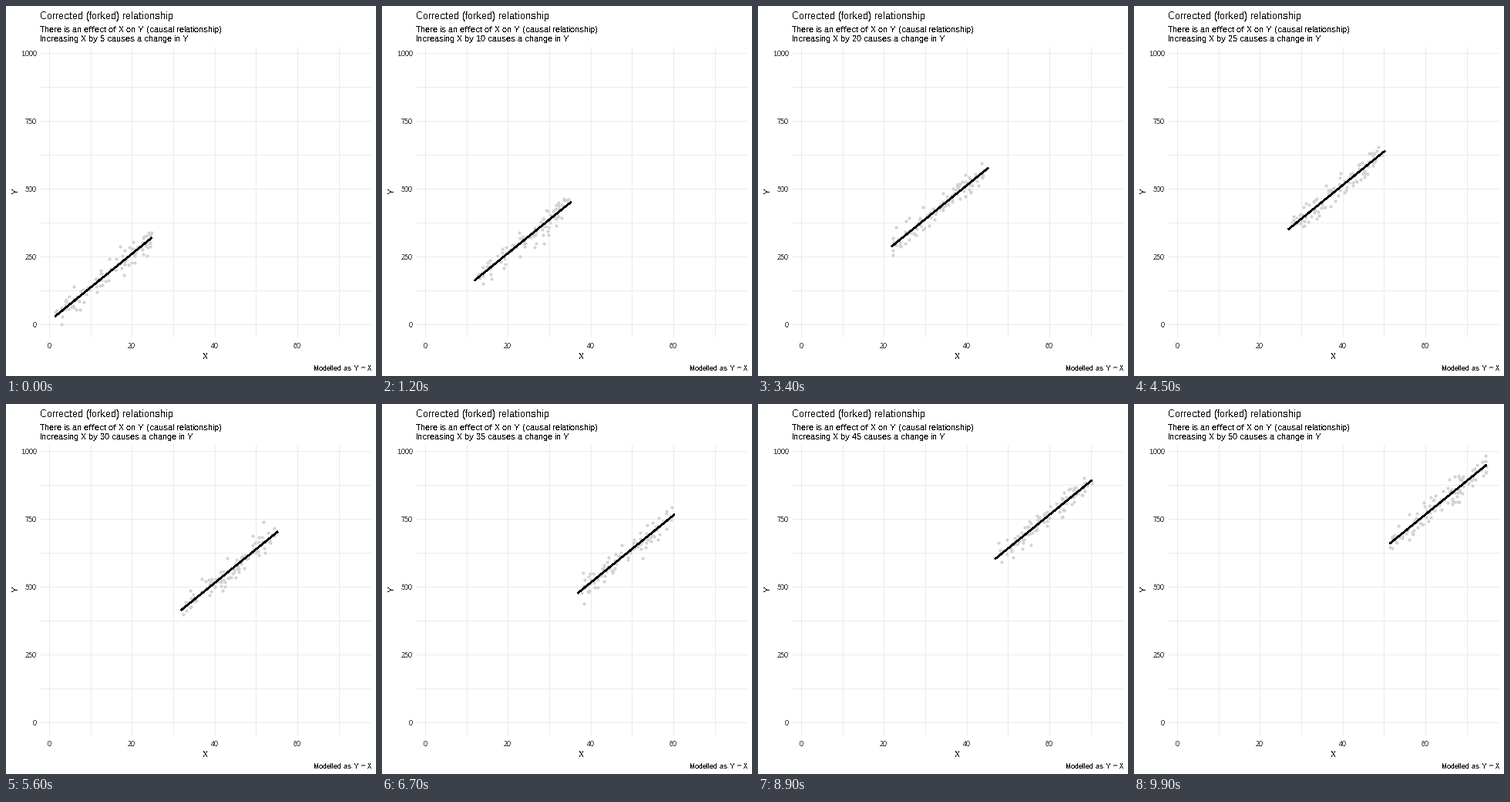
Animation of 480x480 px, one loop 10000 ms. Source, as a matplotlib script:

```python
import matplotlib.pyplot as plt
import numpy as np
from matplotlib.animation import FuncAnimation

plt.rcParams.update({
    "font.family": "Liberation Sans",
    "text.hinting": "native",
    "text.hinting_factor": 1,
    "text.kerning_factor": 6,
    "text.antialiased": False,
})

SIZE = 480
FRAMES, STEP = 100, 11          # frames per loop, frames per transition
STATES, N_POINTS = 10, 100
LEFT, RIGHT, TOP, BOTTOM = 44, 474, 53, 430


def px(x):
    return 56 + 5.367 * x


def py(y):
    return 413.3 - 0.352 * y


def make_state(k, rng):
    """Fitted line ends and scattered points of one state, in pixels."""
    shift = 5 * (k + 1) if k else 0
    start, width = 1.4 + shift, 23.4
    u = rng.random(N_POINTS)
    u = (u - u.min()) / np.ptp(u)
    noise = rng.normal(0, 24, N_POINTS)
    noise -= np.polyval(np.polyfit(u, noise, 1), u)
    # The first two points are the ends of the line.
    u = np.concatenate([[0, 1], u])
    noise = np.concatenate([[0, 0], noise])
    y = 30 + 12.6 * shift + 12.4 * width * u + noise
    return np.column_stack([px(start + width * u), py(np.maximum(y, 0))])


rng = np.random.default_rng(12)
states = np.array([make_state(k, rng) for k in range(STATES)])


def tween(frame):
    """Linear blend between neighbouring states."""
    k, part = divmod(frame, STEP)
    nxt = min(k + 1, STATES - 1)
    return states[k] + (states[nxt] - states[k]) * part / STEP


fig = plt.figure(figsize=(SIZE / 72, SIZE / 72), dpi=72, facecolor="white")
ax = fig.add_axes([0, 0, 1, 1])
ax.set_xlim(0, SIZE)
ax.set_ylim(SIZE, 0)
ax.axis("off")


def label(x, y, text, size, color="black", **kw):
    return ax.text(x, y, text, fontsize=size, color=color, **kw)


def rule(xs, ys):
    ax.plot(xs, ys, color="#ebebeb", lw=1, solid_capstyle="butt",
            snap=False, zorder=1)


for tick in range(0, 80, 10):
    x = round(px(tick))
    rule([x + 0.5] * 2, [TOP, BOTTOM])
    if tick % 20 == 0:
        label(x, 444, str(tick), 9, "#4d4d4d", ha="center")

for tick in range(0, 1001, 125):
    y = round(py(tick))
    rule([LEFT, RIGHT], [y + 0.5] * 2)
    if tick % 250 == 0:
        label(40, y + 4, str(tick), 9, "#4d4d4d", ha="right")

label(44, 17, "Corrected (forked) relationship", 13)
label(44, 34, "There is an effect of X on Y (causal relationship)", 11)
subtitle = label(44, 46, "", 11)
label(258.5, 458, "X", 11, ha="center")
label(12.5, 240, "Y", 11, ha="center", va="center", rotation=90)
label(474, 473, "Modelled as Y ~ X", 9, ha="right")

dots = ax.scatter([], [], s=4.2 ** 2, c="#d3d3d3", linewidths=0,
                  antialiased=False, zorder=2)
line, = ax.plot([], [], color="black", lw=1.6, solid_capstyle="butt",
                antialiased=False, zorder=3)


def update(frame):
    now = tween(frame)
    line.set_data(*now[:2].T)
    dots.set_offsets(now[2:])
    nearest = int(frame / STEP + 0.5)
    subtitle.set_text(
        f"Increasing X by {5 * (nearest + 1)} causes a change in Y")
    return dots, line, subtitle


anim = FuncAnimation(fig, update, frames=FRAMES, interval=100,
                     repeat=True, repeat_delay=0, blit=False)
plt.show()
```
